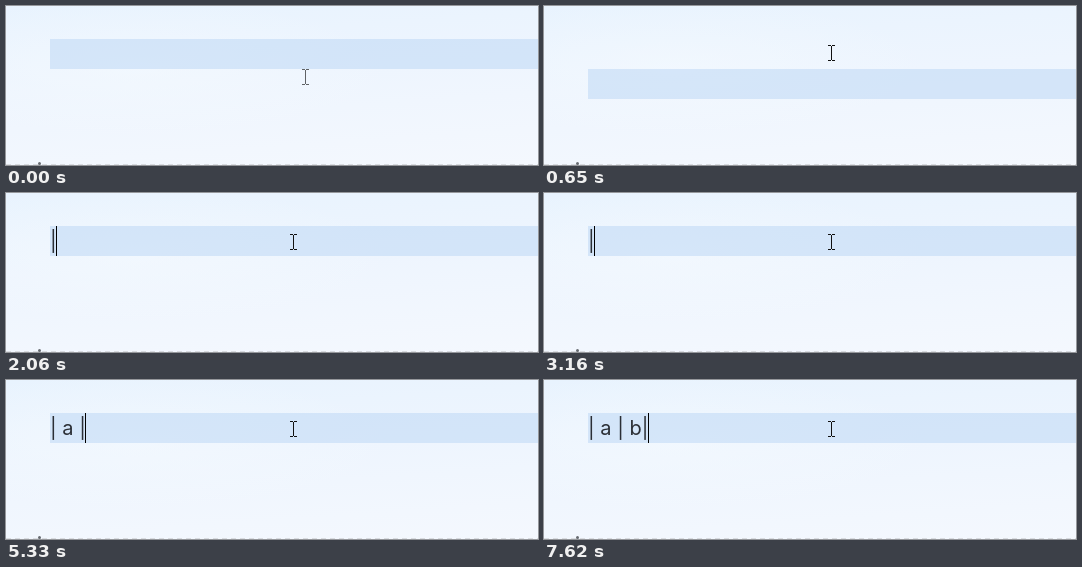
These frames come from a looping animation (532 by 159 pixels, 8000 ms). An HTML page:

```html
<!DOCTYPE html>
<html lang="en">
<head>
<meta charset="utf-8">
<title>Typing a table row</title>
<style>
  html, body { margin: 0; width: 100%; height: 100%; overflow: hidden; }
  .stage {
    position: relative; width: 532px; height: 159px; overflow: hidden;
    background:
      radial-gradient(ellipse 260px 70px at 130px 62px, rgba(245, 250, 255, .55), transparent),
      linear-gradient(176deg, #e8f3fe, #eef5fe 45%, #f4f8fe);
  }
  .stage > * { position: absolute; animation: 8s step-end infinite; }

  .row {
    left: 44px; top: 33px; width: 488px; height: 30px;
    background: rgba(186, 214, 246, .5);
    animation-name: row;
  }
  .text {
    left: 44px; top: 33px; height: 30px; overflow: hidden;
    font: 400 20px/30px Inter, sans-serif; color: #2b2f36; white-space: pre;
    animation-name: type;
  }
  .caret {
    left: 0; top: 33px; width: 1px; height: 30px; background: #000;
    animation-name: caret, blink;
  }
  .click {
    left: 270px; top: 31px; width: 30px; height: 30px; border-radius: 50%;
    background: #e6f17f;
    animation-name: click;
  }
  .pointer { left: 0; top: 0; width: 7px; height: 16px; animation-name: pointer; }
  .rule {
    left: 0; top: 158px; width: 532px; height: 1px;
    background: repeating-linear-gradient(90deg, #d9dce1 0 5px, transparent 5px 9px);
  }
  .dot { left: 32px; top: 156px; width: 3px; height: 3px; border-radius: 50%; background: #666a70; }

  @keyframes row {
    0%, 10.75% { transform: none; }
    1.25% { transform: translateY(30px); }
  }
  @keyframes click {
    0%, 12.125% { opacity: 0; }
    10.75% { opacity: 1; }
  }
  @keyframes pointer {
    0% { transform: translate(296px, 63px); opacity: .65; }
    8.125% { transform: translate(284px, 39px); opacity: 1; }
    10.75% { transform: translate(284px, 39px); opacity: .65; }
    12.125% { transform: translate(284px, 39px); opacity: 1; }
    14.875%, 100% { transform: translate(284px, 41px); opacity: 1; }
  }
  @keyframes type {
    0% { width: 0; }
    25.75% { width: 7px; }
    40.75% { width: 12px; }
    51.75% { width: 23.5px; }
    62.75% { width: 29px; }
    66.625% { width: 36px; }
    73.5% { width: 41px; }
    84.5% { width: 54px; }
    95.25%, 100% { width: 62px; }
  }
  @keyframes caret {
    0% { transform: translate(44px, 30px); }
    10.75% { transform: translate(44px, 0); }
    25.75% { transform: translate(50px, 0); }
    40.75% { transform: translate(56px, 0); }
    51.75% { transform: translate(67px, 0); }
    62.75% { transform: translate(73px, 0); }
    66.625% { transform: translate(79px, 0); }
    73.5% { transform: translate(85px, 0); }
    84.5% { transform: translate(97px, 0); }
    95.25%, 100% { transform: translate(104px, 0); }
  }
  @keyframes blink {
    0%, 8.125%, 17.625%, 32.625%, 47.625%, 58.625%, 79.125% { opacity: 0; }
    1.25%, 10.75%, 24.25%, 39.5%, 51.75%, 62.75%, 84.5%, 100% { opacity: 1; }
  }
</style>
</head>
<body>
<div class="stage">
  <div class="row"></div>
  <div class="click"></div>
  <div class="text">| a | b|</div>
  <div class="caret"></div>
  <svg class="pointer" viewBox="0 0 7 16" fill="none" stroke="#111">
    <path d="M0 .5h3M4 .5h3M3.5 1v14M0 15.5h3M4 15.5h3"/>
  </svg>
  <div class="rule"></div>
  <div class="dot"></div>
</div>
</body>
</html>
```
